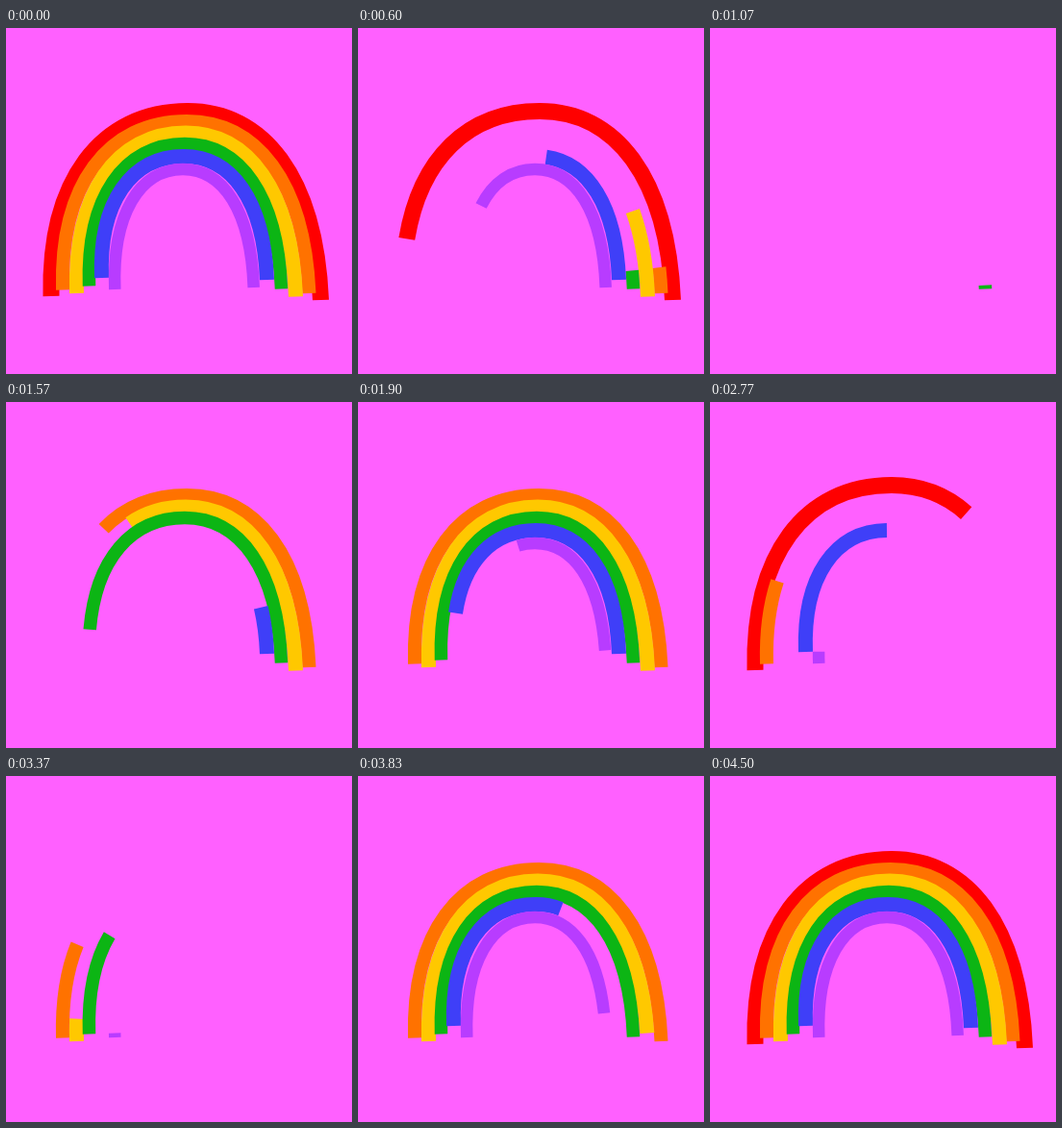
Write an HTML page that moves like this. It is 360 by 360 pixels and loops after 4530 ms.

```html
<!DOCTYPE html>
<html lang="en">
<head>
<meta charset="utf-8">
<title>Rainbow</title>
<style>
  html, body { margin: 0; height: 100%; overflow: hidden; background: #ff60ff; }
  svg { display: block; width: 100%; height: 100%; }
  path { fill: none; }
</style>
</head>
<body>
<svg id="stage" viewBox="0 0 360 360"></svg>
<script>
const LOOP = 4530;

// Each band: left foot, crown, right foot, and four [start, duration] moves:
// leave to the right, return from the right, leave to the left, return from the left.
const bands = [
  { color: '#ff0000', width: 17, left: [47, 279], top: [189, 86.5], right: [327.5, 283],
    moves: [[485, 560], [1976, 400], [2497, 700], [3830, 450]] },
  { color: '#ff7200', width: 14, left: [59, 272.5], top: [188, 97], right: [315.5, 276],
    moves: [[155, 520], [1192, 600], [2332, 600], [3198, 600]] },
  { color: '#ffc800', width: 15, left: [73.5, 276], top: [187, 109], right: [301.5, 279.5],
    moves: [[230, 520], [1216, 600], [2138, 600], [3289, 600]] },
  { color: '#0cb514', width: 13.5, left: [86.5, 268.5], top: [186, 120.5], right: [286.5, 271.5],
    moves: [[150, 520], [1033, 650], [2146, 600], [3169, 600]] },
  { color: '#3f3ff8', width: 15, left: [99.5, 260], top: [185, 133.5], right: [271.5, 262],
    moves: [[330, 520], [1429, 600], [2470, 600], [3500, 600]] },
  { color: '#b83cff', width: 12.5, left: [113.3, 272], top: [184, 147], right: [257.7, 270],
    moves: [[420, 520], [1580, 600], [1772, 1130], [3330, 600]] }
];

function arch({ left: [lx, ly], top: [tx, ty], right: [rx, ry] }) {
  const lw = tx - lx, rw = rx - tx;
  return `M${lx} ${ly}` +
    `C${lx - 3} ${ly - 0.62 * (ly - ty)} ${tx - 0.64 * lw} ${ty} ${tx} ${ty}` +
    `C${tx + 0.57 * rw} ${ty} ${rx - 0.04 * rw} ${ry - 0.65 * (ry - ty)} ${rx} ${ry}`;
}

function ease(time, [start, duration]) {
  const p = Math.min(1, Math.max(0, (time - start) / duration));
  return p * p * (3 - 2 * p);
}

const stage = document.getElementById('stage');
for (const band of bands) {
  const path = document.createElementNS(stage.namespaceURI, 'path');
  path.setAttribute('d', arch(band));
  path.setAttribute('stroke', band.color);
  path.setAttribute('stroke-width', band.width);
  stage.append(path);
  band.path = path;
  band.length = path.getTotalLength();
}

function draw(time) {
  for (const { path, length, moves } of bands) {
    const [outRight, inRight, outLeft, inLeft] = moves.map(m => ease(time, m));
    const from = outRight - inRight;
    const to = 1 - outLeft + inLeft;
    const span = to - from;
    path.style.visibility = span * length > 0.3 ? 'visible' : 'hidden';
    // a little slack keeps a finished end free of rounding gaps
    const slack = to > 0.9999 ? 1 : 0;
    path.setAttribute('stroke-dasharray',
      `0 ${from * length} ${Math.max(0, span) * length + slack} ${2 * length}`);
  }
}

const begin = performance.now();
function tick() {
  draw((performance.now() - begin) % LOOP);
  requestAnimationFrame(tick);
}
tick();
</script>
</body>
</html>
```
